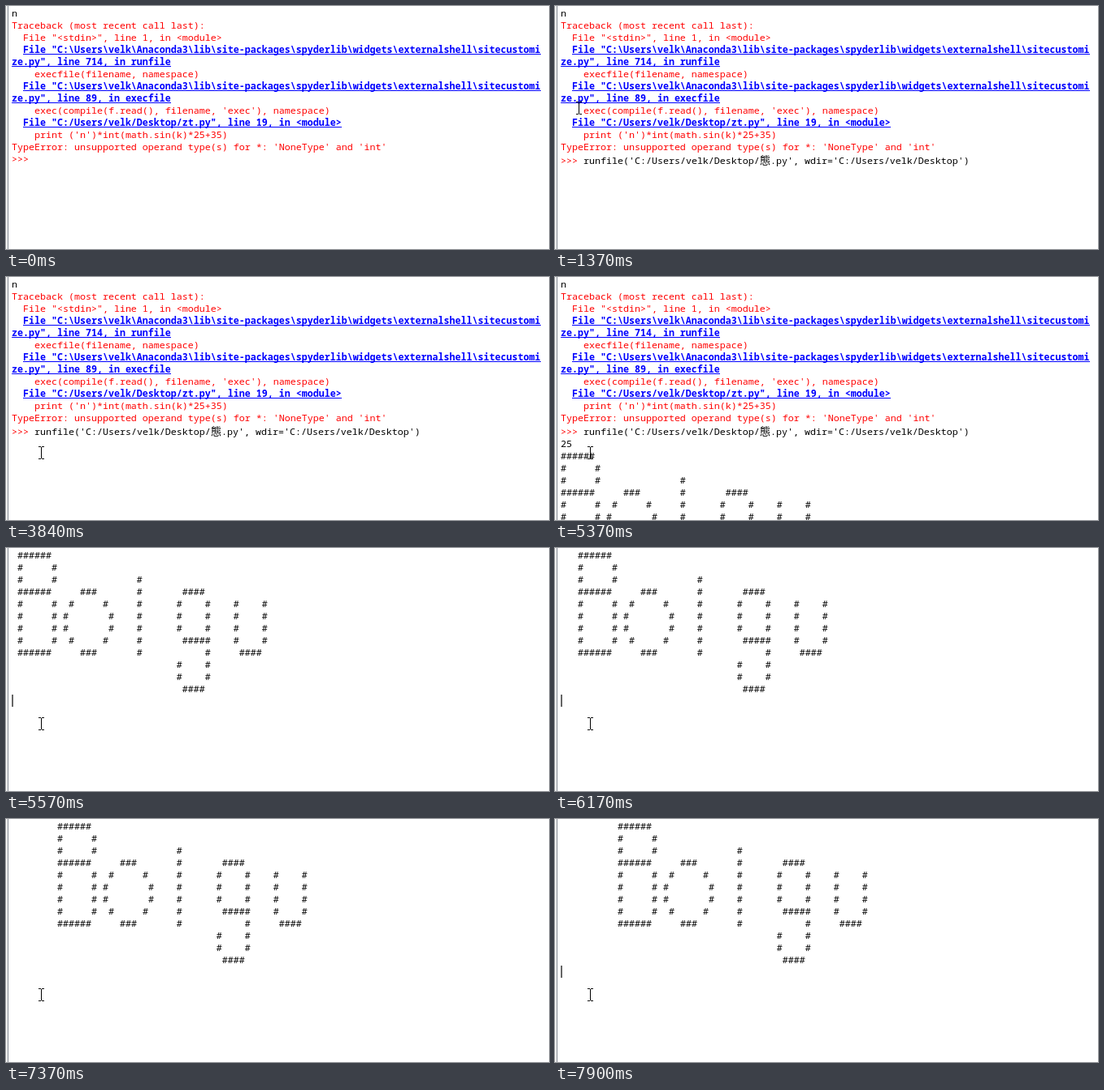
An HTML page with a canvas that plays this animation: 668x300 px, repeating every 8 s.

```html
<!DOCTYPE html>
<html lang="en">
<head>
<meta charset="utf-8">
<title>Console session</title>
<style>
  html, body { margin: 0; width: 668px; height: 300px; overflow: hidden; background: #fff; }
  canvas { display: block; }
</style>
</head>
<body>
<canvas id="stage" width="668" height="300"></canvas>
<script>
const ctx = document.getElementById('stage').getContext('2d');
const LOOP = 8000, COL = 7, ROW = 15, LEFT = 7, BASE = 13;
const TICK = 200 / 3;
const MONO = '"Noto Sans Mono", "DejaVu Sans Mono", monospace';
const RED = '#f00', BLUE = '#00f', BLACK = '#000';

const LIB = String.raw`  File "C:\Users\velk\Anaconda3\lib\site-packages\spyderlib\widgets\externalshell\sitecustomi`;
const TRACEBACK = [
  ['n', BLACK],
  ['Traceback (most recent call last):', RED],
  ['  File "<stdin>", line 1, in <module>', RED],
  [LIB, BLUE],
  ['ze.py", line 714, in runfile', BLUE],
  ['    execfile(filename, namespace)', RED],
  [LIB, BLUE],
  ['ze.py", line 89, in execfile', BLUE],
  ["    exec(compile(f.read(), filename, 'exec'), namespace)", RED],
  ['  File "C:/Users/velk/Desktop/zt.py", line 19, in <module>', BLUE],
  ["    print ('n')*int(math.sin(k)*25+35)", RED],
  ["TypeError: unsupported operand type(s) for *: 'NoneType' and 'int'", RED]
];

const BANNER = [
  '######',
  '#     #',
  '#     #              #',
  '######     ###       #       ####',
  '#     #  #     #     #      #    #    #    #',
  '#     # #       #    #      #    #    #    #',
  '#     # #       #    #      #    #    #    #',
  '#     #  #     #     #       #####    #    #',
  '######     ###       #           #     ####',
  ' '.repeat(28) + '#    #',
  ' '.repeat(28) + '#    #',
  ' '.repeat(29) + '####'
];

// Times at which the banner moves one column to the right.
const SHIFTS = [5570, 5900, 6170, 6370, 6570, 6900, 7100, 7370, 7700, 7900];

// Caret states: time, then x and y when visible.
const CARET = [
  [0], [500, 35, 181], [640, 7, 198], [1040], [3300, 7, 198], [3840],
  [4170, 14, 198], [4370], [4900, 21, 198], [5300, 7, 213], [5370],
  [5570, 7, 181], [5970], [6170, 7, 181], [6440], [6570, 7, 181],
  [7040], [7570, 7, 181]
];

function text(str, x, y, color = BLACK, weight = 400) {
  ctx.font = `${weight} ${COL / 0.6}px ${MONO}`;
  ctx.fillStyle = color;
  ctx.fillText(str, x, y);
}

function rect(x, y, w, h, color) {
  ctx.fillStyle = color;
  ctx.fillRect(x, y, w, h);
}

function consoleLine([str, color], row) {
  const y = BASE + row * ROW;
  const isLink = color === BLUE;
  text(str, LEFT, y, color, isLink ? 700 : 400);
  if (isLink) {
    const indent = str.length - str.trimStart().length;
    rect(LEFT + indent * COL, y + 1, (str.length - indent) * COL, 1, BLUE);
  }
}

function banner(column, top) {
  BANNER.forEach((line, i) => text(line, LEFT + column * COL, top + i * ROW));
}

function command(y) {
  text("runfile('C:/Users/velk/Desktop/", 35, y);
  ctx.font = '13px "Noto Sans CJK SC", "Noto Sans CJK", sans-serif';
  ctx.fillText('態', 252, y);
  text(".py', wdir='C:/Users/velk/Desktop')", 265, y);
}

function transcript(t) {
  TRACEBACK.forEach(consoleLine);
  // The tall glyph in the command pushes its line down slightly.
  const promptY = BASE + 12 * ROW + (t >= 640 ? 2 : 0);
  text('>>>', LEFT, promptY, RED);
  if (t >= 640) command(promptY);
  if (t >= 4170) text(t < 4370 ? '2' : '25', LEFT, promptY + ROW);
  if (t >= 5370) banner(0, promptY + 2 * ROW);
}

function caret(t) {
  const [, x, y] = CARET.findLast(state => state[0] <= t);
  if (x) rect(x, y, 2, ROW, '#666');
}

function pointerAt(t) {
  const now = 500 + Math.floor((t - 500 + 4) / TICK) * TICK;
  if (t >= 1370 && t < 1700) {
    const u = (now - 1366) / 270;
    const y = 126 + 14 * u;
    return { x: 29 + 48 * Math.sin(Math.PI * u), y, hand: y >= 137 };
  }
  if (t < 2500) return null;
  if (t < 3300) {
    const u = (now - 2500) / 800, p = 1 - (1 - u) ** 2, q = 1 - p;
    return {
      x: 194 * q * q + 2 * p * q * 50 + 44 * p * p,
      y: 97 * q * q + 2 * p * q * 313 + 216 * p * p,
      hand: t < 2570
    };
  }
  return { x: t < 3440 ? 44 : 43, y: t < 3500 ? 216 : 217, hand: false };
}

function iBeam(x, y) {
  rect(x, y - 7, 1, 14, BLACK);
  for (const edge of [y - 8, y + 7]) {
    rect(x - 3, edge, 3, 1, BLACK);
    rect(x + 1, edge, 3, 1, BLACK);
  }
}

function hand(x, y) {
  ctx.save();
  ctx.translate(x - 6, y);
  ctx.lineWidth = 1;
  ctx.strokeStyle = BLACK;
  ctx.fillStyle = '#fff';
  ctx.stroke(new Path2D());
  const outline = new Path2D('M5.5 12.5V2Q5.5.5 7 .5T8.5 2V6.5Q11.5 5.5 11.5 7.5Q14 6.5 14 8.5Q15.5 8 15.5 10V15L13.5 19V21.5H5.5V19L1 13.5Q0 11.5 1.5 10.5Q3 10 5.5 13Z');
  ctx.fill(outline);
  ctx.stroke(outline);
  ctx.stroke(new Path2D('M8.5 6.5V11M11.5 7.5V11M14 8.5V11'));
  ctx.restore();
}

function draw(t) {
  rect(0, 0, 668, 300, '#fff');
  rect(0, 0, 2, 300, '#f0f0f0');
  rect(2, 0, 1, 300, '#828790');
  if (t < 5570) transcript(t);
  else banner(SHIFTS.filter(time => time <= t).length, BASE);
  caret(t);
  const pointer = pointerAt(t);
  if (pointer) (pointer.hand ? hand : iBeam)(Math.round(pointer.x), Math.round(pointer.y));
}

const start = performance.now();
function tick() {
  draw((performance.now() - start) % LOOP);
  requestAnimationFrame(tick);
}
tick();
</script>
</body>
</html>
```
